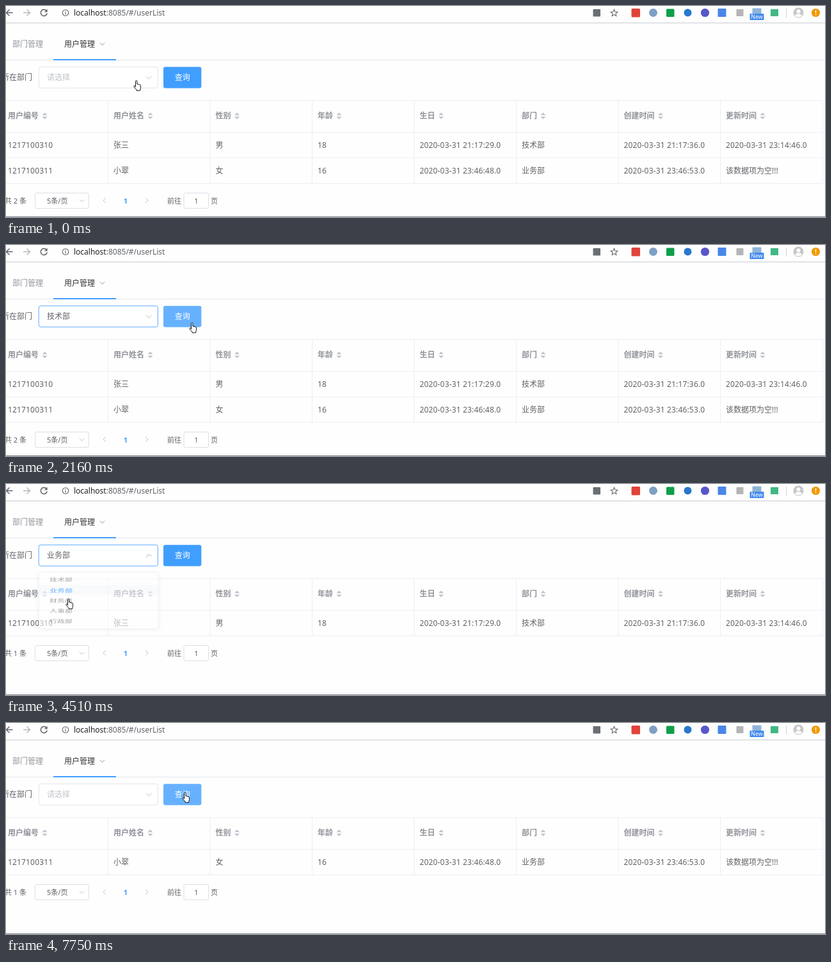
These frames come from a looping animation (1280x330 px, 8000 ms). An HTML page:

```html
<!DOCTYPE html>
<html lang="zh-CN">
<head>
<meta charset="utf-8">
<title>用户管理</title>
<style>
html, body { margin: 0; width: 100%; height: 100%; overflow: hidden; background: #fefefe; }
svg { display: block; width: 1280px; height: 330px; }
text { font-family: "Noto Sans", "Noto Sans CJK SC", "Noto Sans CJK", sans-serif; white-space: pre; }
.shadow { filter: drop-shadow(0 2px 5px rgba(0, 0, 0, .1)); }
</style>
</head>
<body>
<svg id="stage" viewBox="0 0 1280 330" xmlns="http://www.w3.org/2000/svg"></svg>
<script>
const LOOP = 8000;
const BLUE = '#409eff', LIGHT = '#66b1ff', PRESSED = '#3a8ee6';
const TEXT = '#606266', MUTED = '#909399', PALE = '#c0c4cc', BORDER = '#dcdfe6', LINE = '#ebeef5';
const DEPTS = ['技术部', '业务部', '财务部', '人事部', '行政部'];
const HEADS = ['用户编号', '用户姓名', '性别', '年龄', '生日', '部门', '创建时间', '更新时间'];
const USERS = [
  ['1217100310', '张三', '男', '18', '2020-03-31 21:17:29.0', '技术部', '2020-03-31 21:17:36.0', '2020-03-31 23:14:46.0'],
  ['1217100311', '小翠', '女', '16', '2020-03-31 23:46:48.0', '业务部', '2020-03-31 23:46:53.0', '该数据项为空!!!']
];

const TICKS = [0, 150, 270, 420, 540, 660, 780, 930, 1080, 1200, 1350, 1470, 1620, 1740, 1890, 2010, 2160,
  2310, 2430, 2730, 3030, 3150, 3300, 3420, 3570, 3690, 3810, 3960, 4080, 4510, 4660, 4810, 4960, 5110,
  5260, 5390, 5670, 6470, 6600, 6740, 7050, 7200, 7480, 7610, 7750];

// Pointer way points: time, x, y
const PATH = [
  [0, 199, 116], [420, 178, 114], [780, 175, 114], [930, 140, 125], [1080, 100, 148], [1200, 88, 152],
  [1350, 88, 152], [2160, 286, 121], [2730, 286, 121], [3420, 150, 114], [3570, 144, 113], [3690, 130, 120],
  [3810, 108, 150], [3960, 95, 176], [4080, 93, 179], [4600, 93, 179], [5390, 267, 121], [5670, 267, 121],
  [6340, 267, 121], [6740, 218, 107], [7200, 218, 107], [7750, 275, 108]
];

const MENUS = [{ from: 330, to: 1290, hover: 2 }, { from: 3486, to: 4477, hover: 0 }];
const MENU_TOP = 138, ITEM_TOP = 144.4, ITEM_H = 28.65;

const within = (t, a, b) => t >= a && t < b;
const clamp = v => Math.max(0, Math.min(1, v));

function bezier(x1, y1, x2, y2) {
  const at = (a, b, s) => 3 * a * s * (1 - s) ** 2 + 3 * b * s * s * (1 - s) + s ** 3;
  return u => {
    if (u <= 0) return 0;
    if (u >= 1) return 1;
    let lo = 0, hi = 1;
    for (let i = 0; i < 24; i++) {
      const mid = (lo + hi) / 2;
      if (at(x1, x2, mid) < u) lo = mid; else hi = mid;
    }
    return at(y1, y2, lo);
  };
}
const zoom = bezier(.23, 1, .32, 1);
const ease = bezier(.25, .1, .25, 1);

// Markup helpers; text is placed by its vertical centre.
const txt = (x, y, s, fill = TEXT, size = 12, extra = '') =>
  `<text x="${x}" y="${y + size * .37}" fill="${fill}" font-size="${size}" ${extra}>${s}</text>`;
const rect = (x, y, w, h, fill, r = 0, extra = '') =>
  `<rect x="${x}" y="${y}" width="${w}" height="${h}" rx="${r}" fill="${fill}" ${extra}/>`;
const circle = (x, y, r, fill, extra = '') => `<circle cx="${x}" cy="${y}" r="${r}" fill="${fill}" ${extra}/>`;
const stroke = (d, color, w = 1, extra = '') =>
  `<path d="${d}" fill="none" stroke="${color}" stroke-width="${w}" ${extra}/>`;
const chevron = (x, y, r, angle, color = PALE) =>
  stroke(`M${-r} ${-r / 2}L0 ${r / 2}L${r} ${-r / 2}`, color, 1, `transform="translate(${x} ${y}) rotate(${angle})"`);
const colX = i => i ? 8.5 + 159.5 * i : 3;

function toolbar() {
  const dark = '#5f6368';
  return stroke('M10.5 10.5H1M5.5 5.5L.5 10.5L5.5 15.5', dark, 1.4) +
    stroke('M27 10.5H37M32.5 5.5L37.5 10.5L32.5 15.5', '#b4b7bb', 1.4) +
    stroke('M63.2 7.4A5 5 0 1 0 64.2 11.5', dark, 1.5) +
    `<path d="M64.6 4.8V9.4H60z" fill="${dark}"/>` +
    circle(93, 10.5, 4.7, 'none', `stroke="${dark}" stroke-width="1.1"`) +
    rect(92.4, 9.8, 1.2, 3.4, dark) + rect(92.4, 7.6, 1.2, 1.3, dark) +
    txt(106, 10.5, `<tspan fill="#202124">localhost</tspan>:8085/#/userList`, dark) +
    rect(917.5, 5, 11.5, 11.5, '#6b6e72', 1) +
    stroke('M950.5 5.5L952 9.1L955.8 9.4L952.9 11.9L953.8 15.6L950.5 13.6L947.2 15.6L948.1 11.9L945.2 9.4L949 9.1z', dark, 1.1) +
    rect(977.5, 4, 13.5, 13.5, '#e0433a', 1.5) +
    circle(1011.5, 10.5, 6.5, '#7d9fc6') +
    rect(1032, 4.5, 12.5, 12.5, '#0e9f4a', 1.5) +
    circle(1065.5, 10.5, 6, '#2878cc') +
    circle(1092.5, 10.5, 6.6, '#5957c9') +
    rect(1112.5, 4, 13, 13, '#4a86e8', 1) +
    rect(1141.5, 5, 11, 11, '#b5b5b5', 1) +
    rect(1166.5, 3.5, 14, 9, '#8fb4d8', 1) +
    rect(1162.5, 12, 22, 10, '#4189ee', 1) +
    txt(1173.5, 17, 'New', '#fff', 8.8, 'text-anchor="middle"') +
    rect(1195, 5, 12, 11, '#41b883') +
    rect(1219, 4, 1, 14, '#d0d2d5') +
    circle(1238.5, 10.5, 8, '#c6c7c9') + circle(1238.5, 8.4, 3, '#fff') +
    `<path d="M1233 15.5Q1234 12.3 1238.5 12.3T1244 15.5Q1241.5 17.4 1238.5 17.4T1233 15.5z" fill="#fff"/>` +
    circle(1265.5, 10.5, 6.6, '#f29900') +
    rect(1264.8, 6.8, 1.5, 4.6, '#fff') + rect(1264.8, 12.6, 1.5, 1.6, '#fff') +
    rect(0, 26, 1280, 1, '#c9cbcf');
}

function tabs() {
  return txt(10, 59.5, '部门管理', MUTED) + txt(91, 59.5, '用户管理', '#303133') +
    chevron(150.5, 59.5, 3.6, 0, MUTED) +
    rect(0, 84, 1277, 1, '#e4e7ed') + rect(74, 83, 98, 2, BLUE);
}

function tableHead() {
  return HEADS.map((name, i) => {
    const c = colX(i) + name.length * 12 + 9.5;
    return txt(colX(i), 172, name, MUTED, 12, 'font-weight="700"') +
      `<path d="M${c - 4} 170.8h8l-4 -4zM${c - 4} 173h8l-4 4z" fill="${PALE}"/>`;
  }).join('') + rect(0, 147.5, 1277, 1, LINE) + rect(0, 197, 1277, 1, LINE);
}

function tableRows(list) {
  const h = 50 + 40 * list.length;
  let out = '';
  for (let i = 1; i <= 8; i++) out += rect(i < 8 ? 159.5 * i - .5 : 1276, 148, 1, h, LINE);
  list.forEach((row, r) => {
    out += rect(0, 237 + 40 * r, 1277, 1, LINE);
    row.forEach((cell, i) => {
      out += txt(colX(i), 218 + 40 * r, cell, TEXT, 12, /^\d/.test(cell) ? 'letter-spacing=".16"' : '');
    });
  });
  return out;
}

function pager(count) {
  const y = 224.5 + 40 * count;
  const box = (x, w) => rect(x, y - 12, w, 24, '#fff', 2.5, `stroke="${BORDER}"`);
  return txt(-2, y, `共 ${count} 条`, TEXT, 11) +
    box(45.5, 84) + txt(64, y, '5条/页', TEXT, 11) + chevron(118.5, y, 3.6, 0) +
    chevron(154, y - .5, 4, 90) + chevron(220, y - .5, 4, -90) +
    txt(187, y, '1', BLUE, 11, 'text-anchor="middle" font-weight="700"') +
    txt(252, y, '前往', TEXT, 11) + box(278, 38.5) +
    txt(297.3, y, '1', TEXT, 11, 'text-anchor="middle"') + txt(320, y, '页', TEXT, 11);
}

function menu(value, hover) {
  return `<g class="shadow">` + rect(51.5, 138.5, 186.5, 155, '#fff', 3.5, 'stroke="#e4e7ed"') +
    '<path d="M81 139.2L86 134L91 139.2z" fill="#fff"/></g>' +
    rect(52, ITEM_TOP + ITEM_H * hover, 185.5, ITEM_H, '#f5f7fa') +
    DEPTS.map((d, i) => {
      const on = d === value;
      return txt(68, 158.7 + ITEM_H * i, d, on ? BLUE : TEXT, 12, on ? 'font-weight="700"' : '');
    }).join('');
}

function field(value, focus, hover, angle) {
  const icon = value && hover
    ? circle(223, 112.3, 4.8, 'none', `stroke="${PALE}"`) + stroke('M221.2 110.5l3.6 3.6M224.8 110.5l-3.6 3.6', PALE)
    : chevron(223, 112, 4.4, angle);
  return txt(-7, 111.7, '所在部门') +
    rect(51.2, 95.2, 186.2, 33, '#fff', 3.2, `stroke="${focus ? BLUE : BORDER}" stroke-width=".85"`) +
    txt(64, 111.7, value || '请选择', value ? TEXT : PALE) + icon;
}

const button = fill => rect(246, 95.2, 59.3, 33.2, fill, 2.8) + txt(263.7, 111.7, '查询', '#fff');

const HAND = 'M3.5 10.5V1.7a1.2 1.2 0 0 1 2.4 0V6.2q1.2-.6 2 .4q1.2-.4 1.8.5q1.8-.2 1.8 1.4v3q0 1.5-.8 3v1.7H5' +
  'v-1.3L1 10.3q-.7-1 .2-1.5q.8-.4 1.5.5z';

function pointer(t) {
  const i = PATH.findIndex(p => p[0] > t);
  if (i < 0) return PATH[PATH.length - 1].slice(1);
  const [a, b] = [PATH[i - 1], PATH[i]];
  const u = (t - a[0]) / (b[0] - a[0]);
  return [a[1] + (b[1] - a[1]) * u, a[2] + (b[2] - a[2]) * u];
}

const stage = document.getElementById('stage');
stage.innerHTML = toolbar() + tabs() + tableHead() +
  ['rows', 'pager', 'field', 'button', 'menu'].map(id => `<g id="${id}"></g>`).join('') +
  rect(0, 329, 1280, 1, '#868b91') +
  `<path id="hand" d="${HAND}" fill="#fff" stroke="#111" stroke-width="1" stroke-linejoin="round"/>`;
const parts = {};
stage.querySelectorAll('[id]').forEach(el => parts[el.id] = el);

function buttonColor(t, over) {
  if (within(t, 2310, 2430)) return PRESSED;
  if (within(t, 5670, 7050)) return '#5ca9fd';
  return over || within(t, 2310, 3486) ? LIGHT : BLUE;
}

function render(t) {
  const [x, y] = pointer(t);
  const tip = x + 4.5;
  const inBar = y >= 95 && y <= 129;
  const overField = inBar && tip > 51 && tip < 238;
  const overButton = inBar && tip > 246 && tip < 305.5;

  const value = t < 1290 ? '' : t < 4477 ? DEPTS[0] : t < 7050 ? DEPTS[1] : '';
  const focus = within(t, 330, 2310) || within(t, 3486, 5600);
  const users = t < 2730 ? USERS : t < 5670 ? [USERS[0]] : [USERS[1]];

  const m = MENUS[t < 2500 ? 0 : 1];
  const phase = f => f(clamp((t - m.from) / 300)) - f(clamp((t - m.to) / 300));
  const open = phase(zoom);
  const item = Math.floor((y - ITEM_TOP) / ITEM_H);
  const hover = item >= 0 && item < DEPTS.length && tip > 51 && tip < 238 ? item : m.hover;

  parts.rows.innerHTML = tableRows(users);
  parts.pager.innerHTML = pager(users.length);
  parts.field.innerHTML = field(value, focus, overField, 180 * phase(ease));
  parts.button.innerHTML = button(buttonColor(t, overButton));
  parts.menu.innerHTML = open > .02 ? menu(value, hover) : '';
  parts.menu.setAttribute('opacity', open);
  parts.menu.setAttribute('transform', `translate(0 ${MENU_TOP * (1 - open)}) scale(1 ${open})`);
  parts.hand.setAttribute('transform', `translate(${Math.round(x)} ${Math.round(y)})`);
}

const start = performance.now();
let shown = -1;
function loop() {
  const t = (performance.now() - start) % LOOP;
  const tick = TICKS.filter(k => k <= t).pop();
  if (tick !== shown) render(shown = tick);
  requestAnimationFrame(loop);
}
loop();
</script>
</body>
</html>
```
